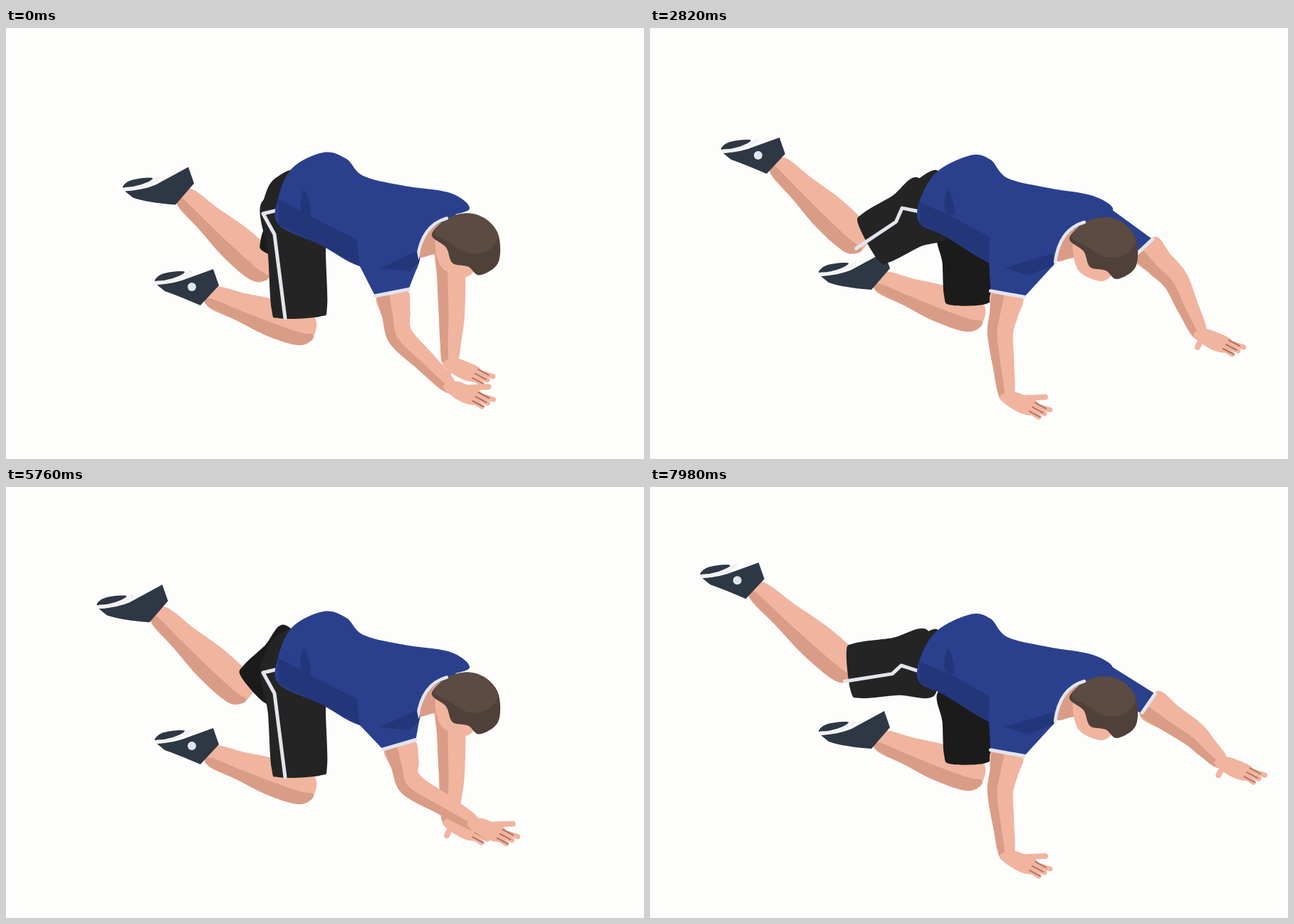
Recreate the animation shown at these times as an HTML page. Size 896 px wide and 606 px high, loop 8 s.

```html
<!DOCTYPE html>
<html lang="en">
<head>
<meta charset="utf-8">
<title>Kneeling arm and leg raise</title>
<style>
html, body { margin: 0; width: 100%; height: 100%; overflow: hidden; background: #fdfdfc; }
svg { display: block; width: 100%; height: 100%; }
path { stroke-linejoin: round; stroke-linecap: round; }
</style>
</head>
<body>
<svg id="stage" viewBox="0 0 896 606"></svg>
<script>
const SKIN = '#f0b49f', TAN = '#d99c87', SHIRT = '#2b408d', NAVY = '#24367a',
      SHORTS = '#242425', BACK = '#1b1b1c', SHOE = '#2e3744', TRIM = '#e3e5ec',
      HAIR = '#5c4b43', DARK_HAIR = '#4f4039';
const stage = document.getElementById('stage');

const pts = s => s.split(' ').map(p => p.split(',').map(Number));
const mid = (a, b, k = .5) => [a[0] + (b[0] - a[0]) * k, a[1] + (b[1] - a[1]) * k];
const line = p => 'M' + p.map(q => q.map(c => c.toFixed(1)).join(' ')).join('L');
const area = p => line(p) + 'Z';

// Closed Catmull-Rom curve
function smooth(p) {
  const at = i => p[(i + p.length) % p.length];
  const lean = (a, b, c) => [a[0] + (c[0] - b[0]) / 6, a[1] + (c[1] - b[1]) / 6];
  return 'M' + p[0] + p.map((q, i) => {
    const next = at(i + 1);
    return 'C' + [lean(q, at(i - 1), next), lean(next, at(i + 2), q), next].join(' ');
  }).join('') + 'Z';
}

function add(tag, attrs, parent = stage) {
  const el = document.createElementNS('http://www.w3.org/2000/svg', tag);
  for (const k in attrs) el.setAttribute(k, attrs[k]);
  return parent.appendChild(el);
}
const fill = (color, parent, d = '') => add('path', { fill: color, d }, parent);
const trace = (color, width, parent, d = '') =>
  add('path', { fill: 'none', stroke: color, 'stroke-width': width, d }, parent);
const blob = (color, parent, p) => fill(color, parent, smooth(pts(p)));
const draw = (el, d) => el.setAttribute('d', d);
const move = (g, x, y) => g.setAttribute('transform', `translate(${x.toFixed(1)} ${y.toFixed(1)})`);

// Joints that travel through key poses as the lift goes from 0 to 1
function joints(knots, ...keys) {
  const list = keys.map(pts);
  return v => {
    let i = 0;
    while (i < knots.length - 2 && v > knots[i + 1]) i++;
    const k = (v - knots[i]) / (knots[i + 1] - knots[i]);
    return list[i].map((p, j) => mid(p, list[i + 1][j], k));
  };
}

// Unit vector across the direction a to b
function across(a, b) {
  const dx = b[0] - a[0], dy = b[1] - a[1], len = Math.hypot(dx, dy) || 1;
  return [-dy / len, dx / len];
}
const shift = (p, n, r) => [p[0] + n[0] * r, p[1] + n[1] * r];

// Centre line with every bone cut in equal parts, then a rounded end
function spine(bones, cuts, cap) {
  const out = [bones[0]];
  for (let i = 1; i < bones.length; i++)
    for (let k = 1; k <= cuts; k++) out.push(mid(bones[i - 1], bones[i], k / cuts));
  if (cap) {
    const [a, b] = bones.slice(-2);
    out.push(mid(a, b, 1 + cap / Math.hypot(b[0] - a[0], b[1] - a[1])));
  }
  return out;
}

// Band along a centre line, from lo to hi times the radius across it
function ribbon(p, radii, lo, hi) {
  const side = k => p.map((q, i) =>
    shift(q, across(p[Math.max(0, i - 1)], p[Math.min(p.length - 1, i + 1)]), radii[i] * k));
  return smooth([...side(lo), ...side(hi).reverse()]);
}

function limb(move, radii, cuts, cap, base, shade) {
  const lit = fill(base), dark = shade && fill(shade);
  return v => {
    const bones = move(v), p = spine(bones, cuts, cap);
    draw(lit, ribbon(p, radii, -1, 1));
    if (dark) draw(dark, ribbon(p, radii, .25, 1));
    return bones;
  };
}
const arm = move => limb(move, [21, 20, 18, 15, 10], 2, 0, SKIN, TAN);
const calf = move => limb(move, [14, 20, 26, 25, 13], 3, 18, SKIN, TAN);
const thigh = (move, r, color) => limb(move, [r * 1.12, r * 1.04, r, r * .72], 2, 13, color);

// Hand around the wrist: palm, thumb and three fingers
function hand(thumb) {
  const g = add('g', {});
  trace(SKIN, 8, g, 'M4 2L' + thumb);
  blob(SKIN, g, '-10,0 6,-8 26,-2 44,8 42,24 24,24 4,14');
  for (let i = 0; i < 3; i++) {
    trace(SKIN, 7, g, `M30 ${8 + 5 * i}L${61 - 8 * i} ${18 + 5 * i}`);
    trace('#a96f5e', 1.8, g, `M${40 - 4 * i} ${8 + 6 * i}l15 8`);
  }
  return g;
}
// Shoe from the toe tip to a collar at (x, y) and a heel
function shoe(x, y, heel) {
  const g = add('g', {});
  blob(SHOE, g, '0,0 8,-8 24,-12 42,-12 26,-2 8,3');
  fill(SHOE, g, `M3 6Q30 4 46 -3L${x} ${y}L${x + 8} ${y + 23}L${heel}Q34 22 14 15Z`);
  trace('#f2f2f2', 5, g, 'M3 3Q26 3 50 -12');
  return g;
}
// Cloth from two body points to a cuff across the arm
function sleeve(r) {
  const cloth = fill(SHIRT), cuff = trace(TRIM, 5);
  return (from, to, bones) => {
    const n = across(bones[0], bones[1]);
    const a = shift(bones[0], n, r), b = shift(bones[0], n, -r);
    draw(cloth, area([from, a, b, to]));
    draw(cuff, line([a, b]));
  };
}

// Near leg with far arm, and far leg with near arm, lift in turn
const A = [0, .16, .73, 1], B = [0, .48, .77, 1];
const farArmPath = joints(A,
  '625,300 626,405 623,472', '650,305 664,402 668,474',
  '695,308 740,354 775,430', '703,302 776,345 816,366');
const nearLegPath = joints(A,
  '287,377 415,422', '265,337 386,410', '176,189 285,292', '135,122 268,232');
const nearThighPath = joints(A,
  '405,240 412,394', '397,240 392,390', '400,250 316,293', '395,245 280,241');
const seamPath = joints(A,
  '378,257 361,261 377,290 392,408', '376,257 360,260 371,295 368,398',
  '378,258 354,253 345,272 288,308', '376,259 352,250 338,258 266,256');
const nearArmPath = joints(B,
  '502,374 492,430 501,519', '543,372 556,434 627,504',
  '551,364 565,422 651,483', '560,353 588,398 692,425');
const farLegPath = joints(B,
  '322,356 450,403', '247,233 355,332', '221,191 333,296', '169,113 290,215');
const farThighPath = joints(B,
  '444,285 446,376', '408,250 387,308', '420,222 365,284', '400,222 306,232');
const torsoPath = joints([0, 1],
  '402,203 450,179 478,185 502,211 560,225 622,236 650,256 608,272 580,292 567,333 531,348 476,330 413,292 379,275 378,245',
  '402,197 446,175 478,184 502,208 560,222 624,232 651,254 616,267 589,287 580,330 566,342 497,335 442,305 383,277 382,240');

// Parts from back to front
const drawFarArm = arm(farArmPath);
const farHand = hand('-4 18');
const drawFarSleeve = sleeve(16);
const drawFarCalf = calf(farLegPath);
const farShoe = shoe(92, -28, '74 25');
const drawFarThigh = thigh(farThighPath, 33, BACK);
blob(SHORTS, stage, '405,203 376,213 363,238 360,262 385,275');
const drawNearCalf = calf(nearLegPath);
const nearShoe = shoe(82, -16, '64 35');
add('circle', { cx: 52, cy: 9, r: 6, fill: TRIM }, nearShoe);
const drawNearThigh = thigh(nearThighPath, 39, SHORTS);
const seam = trace(TRIM, 5);
const torso = fill(SHIRT), belly = fill(NAVY);
blob(NAVY, stage, '417,228 424,238 428,262 414,256');

const head = add('g', {});
blob(TAN, head, '608,280 584,293 571,326 590,324 616,316');
blob(SKIN, head, '594,304 610,308 625,330 650,342 634,356 602,341');
blob(DARK_HAIR, head, '589,296 612,273 640,266 666,275 683,298 682,336 656,353 640,341 618,336 609,314');
blob(HAIR, head, '592,293 612,273 640,266 666,275 682,298 668,318 640,322 612,306');
trace(TRIM, 4.5, head, 'M610 273Q575 283 569 329');

const drawNearArm = arm(nearArmPath);
const nearHand = hand('54 0');
const drawNearSleeve = sleeve(24);
const armpit = fill(NAVY);

const CYCLE = 131, SPAN = 34, LOOP = 8000;

// Three pictures per 140 ms, held 20, 100 and 20 ms
function step(ms) {
  const r = ms % 140;
  return 3 * Math.floor(ms / 140) + (r < 20 ? 0 : r < 120 ? 1 : 2);
}

// Raised cosine around a peak, a little flatter at the top
function lift(n, peak) {
  const gap = Math.abs((n - peak + 1.5 * CYCLE) % CYCLE - CYCLE / 2);
  if (gap >= SPAN) return 0;
  const s = (1 + Math.cos(Math.PI * gap / SPAN)) / 2;
  return s + .55 * s ** 4 * (1 - s);
}

function render(ms) {
  const n = step(ms), a = lift(n, 48), b = lift(n, 113);
  const sway = Math.min(1, b * 2.5), t = torsoPath(sway);

  let bones = drawFarArm(a);
  move(farHand, ...bones[2]);
  drawFarSleeve(t[8], t[5], bones);
  bones = drawFarCalf(b);
  move(farShoe, bones[0][0] - 85, bones[0][1] - 13);
  drawFarThigh(b);

  bones = drawNearCalf(a);
  move(nearShoe, bones[0][0] - 78, bones[0][1] - 22);
  drawNearThigh(a);
  draw(seam, line(seamPath(a)));

  draw(torso, smooth(t));
  draw(belly, area([...t.slice(11), mid(t[12], t[1], .25), mid(t[11], t[2], .25)]));
  const level = Math.max(0, 1 - a * 1.6);
  move(head, 2.5 * level + 6.5 * sway, -1.5 * level - 4 * sway);

  bones = drawNearArm(b);
  move(nearHand, ...bones[2]);
  drawNearSleeve(t[11], t[9], bones);
  draw(armpit, area([t[9], t[10], mid(t[10], t[11], .6), mid(t[9], t[4], .15)]));
}

function tick(now) {
  render(now % LOOP);
  requestAnimationFrame(tick);
}
render(0);
requestAnimationFrame(tick);
</script>
</body>
</html>
```
